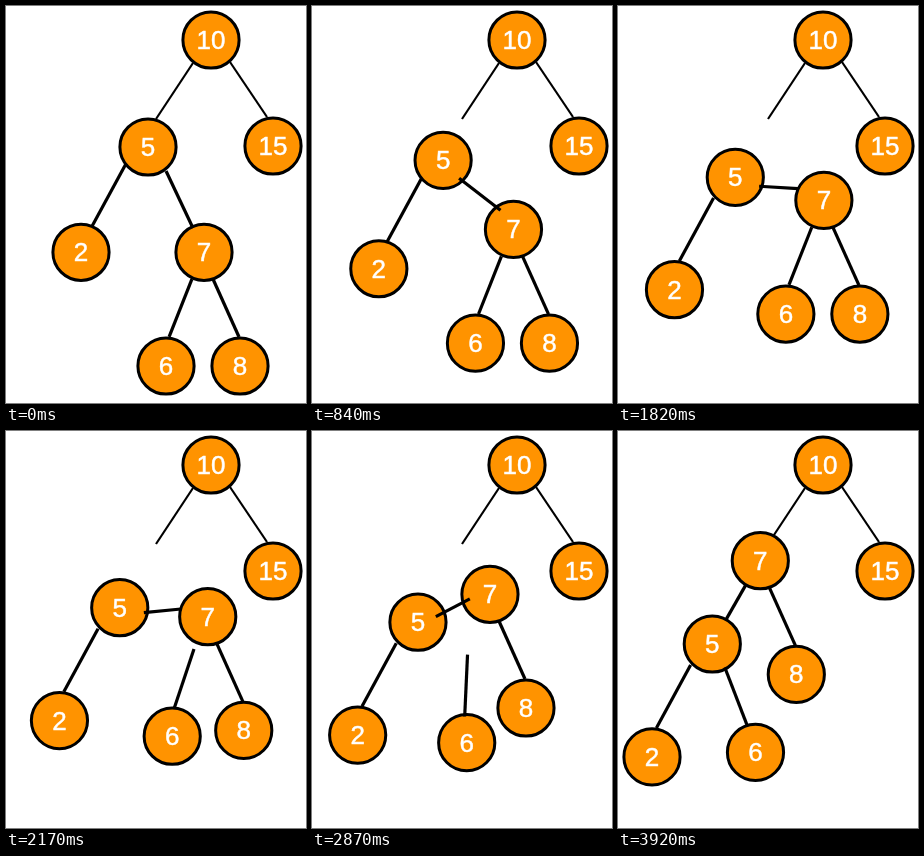
An HTML page with a canvas that plays this animation: 300x397 px, repeating every 4.06 s.

```html
<!DOCTYPE html>
<html lang="en">
<head>
<meta charset="utf-8">
<title>Tree rotation</title>
<style>
  html, body { margin: 0; width: 100%; height: 100%; overflow: hidden; background: #fff; }
  canvas { display: block; }
</style>
</head>
<body>
<canvas id="stage" width="300" height="397"></canvas>
<script>
const ctx = document.getElementById('stage').getContext('2d');
const LOOP = 4060, TICK = 70, STEPS = 27;
const HALF = LOOP / 2;
const RADIUS = 28.1;

// Shifts shared by parts that travel together.
const rise = [8.5, -56.1];    // right subtree, first half
const swing = [-64.2, -60.5]; // 7 and 8, second half
const sink = [-21, 39.2];     // 5 and 2, second half

// Progress of each half: one tick of rest, then equal steps.
function progress(t) {
  const ramp = ms => Math.max(0, Math.min(1, Math.floor(ms / TICK) / STEPS));
  return [ramp(t - TICK), ramp(t - HALF)];
}

function line(x1, y1, x2, y2, width) {
  ctx.lineWidth = width;
  ctx.beginPath();
  ctx.moveTo(x1, y1);
  ctx.lineTo(x2, y2);
  ctx.stroke();
}

function draw(t) {
  const [a, b] = progress(t);
  const mix = (v, d1, d2) => v + d1 * a + d2 * b;

  function node(label, x, y, first = [0, 0], second = [0, 0]) {
    x = mix(x, first[0], second[0]);
    y = mix(y, first[1], second[1]);
    ctx.beginPath();
    ctx.arc(x, y, RADIUS, 0, Math.PI * 2);
    ctx.fill();
    ctx.lineWidth = 3;
    ctx.stroke();
    ctx.save();
    ctx.fillStyle = ctx.strokeStyle = '#fff';
    ctx.lineWidth = 0.5;
    ctx.fillText(label, x, y + 9);
    ctx.strokeText(label, x, y + 9);
    ctx.restore();
  }

  function edge(x, y, length, degrees, first, second) {
    x = mix(x, first[0], second[0]);
    y = mix(y, first[1], second[1]);
    const angle = degrees * Math.PI / 180;
    const dx = Math.cos(angle) * length / 2, dy = Math.sin(angle) * length / 2;
    line(x - dx, y - dy, x + dx, y + dy, 3.2);
  }

  ctx.fillStyle = '#fff';
  ctx.fillRect(0, 0, 300, 397);
  ctx.strokeStyle = '#000';
  ctx.fillStyle = '#ff9300';
  ctx.font = '26px "Liberation Sans", Arial, sans-serif';
  ctx.textAlign = 'center';

  line(187, 57, 150, 113, 2.2);
  line(224, 56, 261, 111, 2.2);

  node('10', 205, 34);
  node('15', 267, 140);
  node('2', 75, 246.3, [-20, 40.4], sink);
  node('5', 142, 141, [-26.7, 32.8], sink);
  node('6', 160, 360, rise, [-31, 17.5]);
  node('8', 234, 360, rise, swing);
  node('7', 198, 246.3, rise, swing);

  // The link between 5 and 7 shrinks as it turns over; the one to 6 changes parent.
  edge(103, 189, 71.7, 118.5, [-26.5, 37.3], sink);
  edge(220, 302, 63.6, 65.8, rise, swing);
  edge(174.5, 302, 62, mix(111.6, 0, -42.7), rise, [-65, 19.5]);
  edge(173.5, 193.5, mix(63, -26, 3), mix(64.7, -66, -59), [-14, -13], [-42, -8.5]);
}

function loop() {
  draw(performance.now() % LOOP);
  requestAnimationFrame(loop);
}
loop();
</script>
</body>
</html>
```
